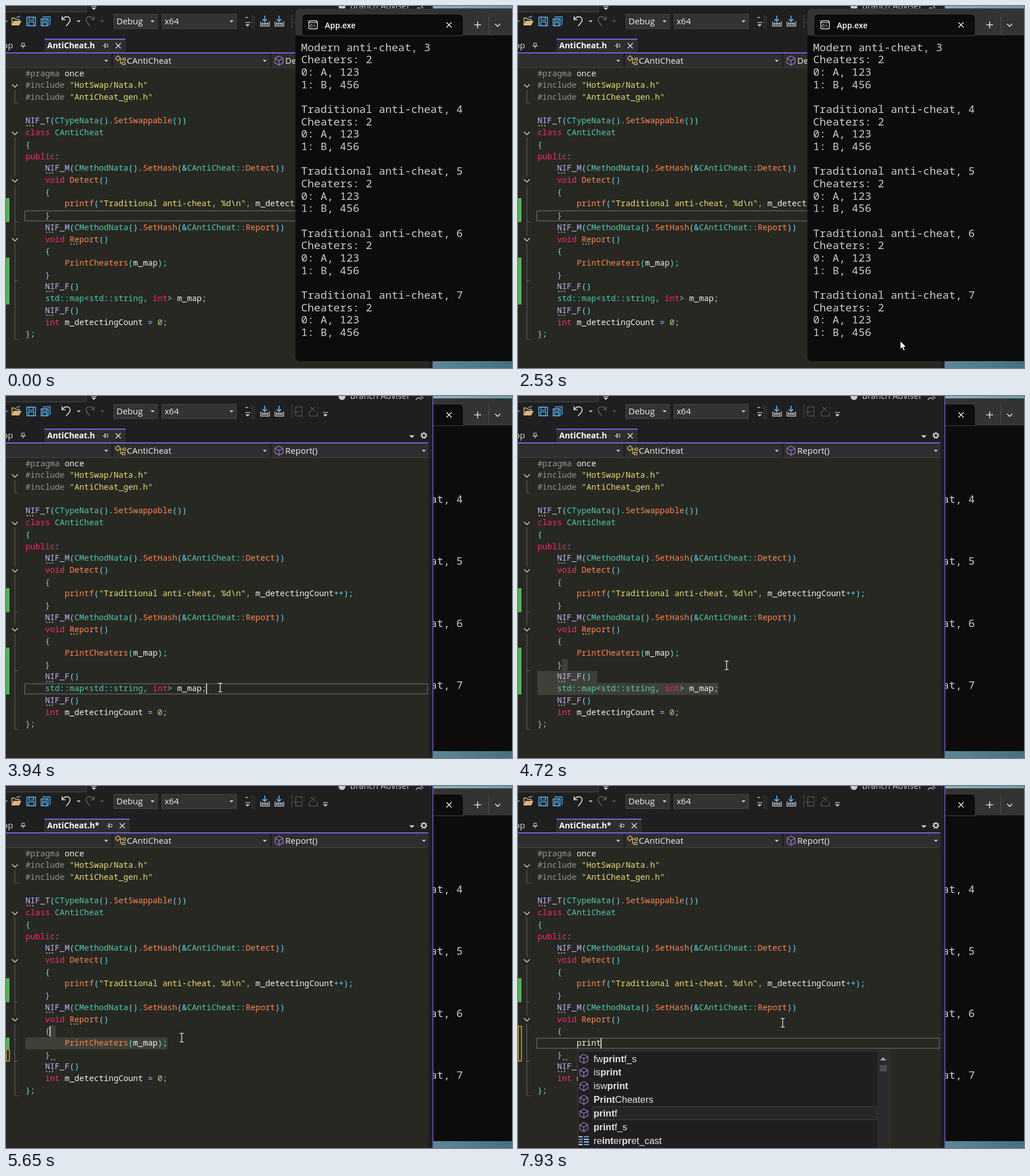
An HTML page with a canvas that plays this animation: 884x633 px, repeating every 8 s.

```html
<!DOCTYPE html>
<html lang="en">
<head>
<meta charset="utf-8">
<title>Hot swap demo</title>
<style>
html, body { margin: 0; width: 100%; height: 100%; overflow: hidden; background: #1f1f1f; }
canvas { display: block; }
</style>
</head>
<body>
<canvas id="stage" width="884" height="633"></canvas>
<script>
const ctx = document.getElementById('stage').getContext('2d');
const LOOP = 8000, ROW = 20.72, TOP = 108, LEFT = 34;
const MONO = '"Noto Sans Mono", "DejaVu Sans Mono", monospace';
const UI = '"Open Sans", "Noto Sans", sans-serif';
const LIST = '"Liberation Sans", sans-serif';
const CODE_FONT = '14.25px ' + MONO;

// Moments of the story, in ms
const RAISE = 3910, CUT = 4920, PRESS = 5400, RELEASE = 5920, ENTER = 6680, POPUP = 7620;
const KEYS = [7420, 7520, 7610, 7720, 7830];

const MOUSE = [
  [1160, 766, 645], [1170, 765, 629], [1400, 738, 605], [1630, 719, 589],
  [1770, 719, 589], [2040, 670, 586], [2520, 670, 586], [2530, 668, 586],
  [2750, 632, 592], [3050, 470, 553], [3320, 367, 520], [3340, 366, 519.5],
  [3590, 366, 519.5], [3790, 374.5, 511], [3930, 374.5, 511], [4120, 371, 488],
  [4320, 365, 472], [4430, 364.5, 471], [4920, 364.5, 471], [5350, 313, 452],
  [5480, 312, 452], [5650, 307, 440], [5720, 295, 435], [5750, 294, 433.5],
  [5920, 294, 433.5], [5990, 330, 452], [6170, 462.5, 414]
];

const SOURCE = `#pragma once
#include "HotSwap/Nata.h"
#include "AntiCheat_gen.h"

NIF_T(CTypeNata().SetSwappable())
class CAntiCheat
{
public:
    NIF_M(CMethodNata().SetHash(&CAntiCheat::Detect))
    void Detect()
    {
        printf("Traditional anti-cheat, %d\\n", m_detectingCount++);
    }
    NIF_M(CMethodNata().SetHash(&CAntiCheat::Report))
    void Report()
    {
        PrintCheaters(m_map);
    }
    NIF_F()
    std::map<std::string, int> m_map;
    NIF_F()
    int m_detectingCount = 0;
};`.split('\n');

const ITEMS = ['fw|print|f_s', 'is|print|', 'isw|print|', '|Print|Cheaters',
  '|print|f', '|print|f_s', 're|int|er|pr|et_cast'];

const OUTPUT = [3, 4, 5, 6, 7].flatMap(n => [
  (n === 3 ? 'Modern' : 'Traditional') + ' anti-cheat, ' + n,
  'Cheaters: 2', '0: A, 123', '1: B, 456', ''
]);

const RULES = [
  [/^"/, '#e6db74'], [/^#/, '#949494'], [/^NIF_/, '#bfb5ff'],
  [/^(class|public|void|int)$/, '#f92672'],
  [/^(CTypeNata|CMethodNata|CAntiCheat|std|map|string)$/, '#4ec9b0'],
  [/^(SetSwappable|SetHash|Detect|Report|printf|PrintCheaters)$/, '#ff8650'],
  [/^\d/, '#c5c874'], [/^\w/, '#f0f0ec'], [/./, '#66d9ef']
];

function box(color, x, y, w, h) {
  ctx.fillStyle = color;
  ctx.fillRect(x, y, w, h);
}

function frame(color, x, y, w, h, lw = 1) {
  ctx.strokeStyle = color;
  ctx.lineWidth = lw;
  ctx.strokeRect(x, y, w, h);
}

function round(color, x, y, w, h, r) {
  ctx.fillStyle = color;
  ctx.beginPath();
  ctx.roundRect(x, y, w, h, r);
  ctx.fill();
}

function line(color, lw, ...p) {
  ctx.strokeStyle = color;
  ctx.lineWidth = lw;
  ctx.beginPath();
  for (let i = 0; i < p.length; i += 2) ctx.lineTo(p[i], p[i + 1]);
  ctx.stroke();
}

function disc(color, x, y, r) {
  ctx.fillStyle = color;
  ctx.beginPath();
  ctx.arc(x, y, r, 0, 7);
  ctx.fill();
}

function text(s, x, y, font, color) {
  ctx.font = font;
  ctx.fillStyle = color;
  ctx.fillText(s, x, y);
  return ctx.measureText(s).width;
}

function triangle(color, x, y, r = 3.5, dir = 1) {
  ctx.fillStyle = color;
  ctx.beginPath();
  ctx.moveTo(x - r, y - dir * r / 2);
  ctx.lineTo(x + r, y - dir * r / 2);
  ctx.lineTo(x, y + dir * r / 2);
  ctx.fill();
}

const chevron = (x, y, r, color, lw = 1.5) =>
  line(color, lw, x - r, y - r / 2, x, y + r / 2, x + r, y - r / 2);

function cross(x, y, r, color) {
  line(color, 1.4, x - r, y - r, x + r, y + r);
  line(color, 1.4, x + r, y - r, x - r, y + r);
}

function cube(x, y) {
  const c = '#9b78c8';
  line(c, 1.3, x, y - 8, x + 7, y - 4, x + 7, y + 4, x, y + 8, x - 7, y + 4, x - 7, y - 4, x, y - 8);
  line(c, 1.3, x - 7, y - 4, x, y, x + 7, y - 4);
  line(c, 1.3, x, y, x, y + 8);
}

function pin(x, y, upright) {
  ctx.save();
  ctx.translate(x, y);
  if (upright) ctx.rotate(-Math.PI / 2);
  frame('#d0d0d0', -1, -2.5, 5, 4.5);
  line('#d0d0d0', 1.2, -1, -4.5, -1, 4.5);
  line('#d0d0d0', 1.2, -5, 0, -1, 0);
  ctx.restore();
}

function floppy(x, y, s) {
  const c = '#55aef0';
  frame(c, x - s, y - s, 2 * s, 2 * s, 1.6);
  frame(c, x - s * .5, y - s, s, s * .7, 1.4);
  frame(c, x - s * .6, y + s * .1, s * 1.2, s * .9, 1.4);
}

function swirl(x, y, dir, color) {
  line(color, 1.7, x - 7 * dir, y - 8, x - 7 * dir, y - 2, x - dir, y - 2);
  ctx.beginPath();
  ctx.moveTo(x - 7 * dir, y - 2);
  ctx.bezierCurveTo(x - 2 * dir, y - 10, x + 8 * dir, y - 8, x + 7 * dir, y - 1);
  ctx.quadraticCurveTo(x + 6 * dir, y + 3, x, y + 9);
  ctx.stroke();
}

function download(x) {
  line('#c8c8c8', 1.4, x - 7, 27, x - 7, 35, x + 8, 35, x + 8, 27);
  for (let i = -4; i <= 5; i += 3) box('#c8c8c8', x + i - 1, 29, 2, 4);
  line('#55aef0', 1.8, x, 17, x, 26);
  chevron(x, 25, 4, '#55aef0', 1.8);
}

function toolbar() {
  box('#2b2b2b', 0, 0, 140, 10);
  line('#464646', 1, 0, 10.5, 140.5, 10.5, 140.5, 0);
  line('#d0d0d0', 1.3, 149, 1, 158, 1);
  triangle('#d0d0d0', 153.5, 5, 4);

  triangle('#c8c8c8', 0, 27, 3);
  ctx.fillStyle = '#dcb67a';
  ctx.beginPath();
  for (const [x, y] of [[10, 34], [13, 26], [27, 26], [23, 34]]) ctx.lineTo(x, y);
  ctx.fill();
  line('#dcb67a', 1.5, 10.5, 34, 10.5, 21, 15, 21, 17, 23.5, 23, 23.5, 23, 26);
  line('#55aef0', 1.5, 18, 20, 25, 18);
  floppy(44, 27, 7.5);
  floppy(67.5, 28.5, 6);
  line('#55aef0', 1.4, 64, 19, 77, 19, 77, 33);
  swirl(105, 26, 1, '#d8d8d8');
  triangle('#c8c8c8', 127, 27);
  swirl(147, 26, -1, '#5c5c5c');
  triangle('#5c5c5c', 168, 27);

  for (const [x, w, label] of [[188, 77, 'Debug'], [272, 131, 'x64']]) {
    box('#333333', x, 14, w, 26);
    frame('#474747', x + .5, 14.5, w - 1, 25);
    text(label, x + 5, 32, '15px ' + UI, '#f0f0f0');
    triangle('#d8d8d8', x + w - 9, 27);
  }
  line('#c8c8c8', 1.3, 418, 20, 423, 20);
  line('#c8c8c8', 1.3, 418, 29, 427, 29);
  triangle('#c8c8c8', 422, 34, 4);
  for (let y = 17; y < 38; y += 4) {
    box('#686868', 429, y, 1.5, 1.5);
    box('#686868', 433, y + 2, 1.5, 1.5);
  }
  download(452);
  download(477);
  line('#505050', 1, 499.5, 15, 499.5, 39);
  frame('#505050', 506, 19, 11, 16, 1.4);
  line('#505050', 1.5, 502, 28, 513, 28);
  line('#505050', 1.4, 530, 27, 530, 35, 544, 35, 544, 27);
  cross(536, 23, 4, '#505050');
  line('#d0d0d0', 1.3, 554, 29, 562, 29);
  triangle('#d0d0d0', 558, 34, 4);

  disc('#c8c8c8', 587, 1, 6);
  text('Branch Adviser', 601, 5, '15px ' + UI, '#d0d0d0');
  line('#d0d0d0', 1.3, 716, 7, 718, 4, 722, 3, 726, 6);
  line('#d0d0d0', 1.3, 725, 0, 729, 4);
}

function tabs(raised, dirty) {
  const shift = dirty ? 7 : 0;
  text('pp', -6, 74, '15px ' + UI, '#d8d8d8');
  pin(30, 69, true);
  box('#2e2e2e', 67, 57, 142 + shift, 25);
  box('#7465df', 67, 57, 142 + shift, 2);
  text('AntiCheat.h' + (dirty ? '*' : ''), 72, 74, 'bold 14px ' + UI, '#ffffff');
  pin(174 + shift, 69.5, false);
  cross(196 + shift, 69.5, 4.5, '#e0e0e0');
  triangle('#d8d8d8', 709, 71, 4.5);
  ctx.setLineDash([2.4, 2]);
  ctx.beginPath();
  ctx.arc(730, 69, 5, 0, 7);
  ctx.strokeStyle = '#d0d0d0';
  ctx.lineWidth = 2;
  ctx.stroke();
  ctx.setLineDash([]);
  ctx.beginPath();
  ctx.arc(730, 69, 3.4, 0, 7);
  ctx.stroke();
  box('#7465df', 0, 81, 738, 2);

  box('#2e2e2e', 0, 83, 738, 25);
  box('#1f1f1f', 184, 83, 3, 25);
  box('#1f1f1f', 461, 83, 3, 25);
  box('#424242', 0, 107, 738, 1);
  text(':', -3, 101, '15px ' + UI, '#e0e0e0');
  for (const x of [175, 452, 730]) triangle('#d0d0d0', x, 96);
  const gold = '#d9b064';
  line(gold, 1.4, 191, 91, 196, 87, 200, 91, 195, 96, 191, 91);
  line(gold, 1.3, 198, 93, 205, 93);
  line(gold, 1.3, 200, 93, 200, 100, 203, 100);
  frame(gold, 205, 91, 4, 4, 1.3);
  frame(gold, 203, 98.5, 5, 4, 1.3);
  text('CAntiCheat', 211, 101, '15px ' + UI, '#f0f0f0');
  cube(477, 95.5);
  text(raised ? 'Report()' : 'Detect()', 488, 101, '15px ' + UI, '#f0f0f0');
}

function codeLine(s, row, charW) {
  const token = /"[^"]*"|#?\w+|[^\s\w]/g;
  let m;
  while ((m = token.exec(s))) {
    const color = RULES.find(r => r[0].test(m[0]))[1];
    text(m[0], LEFT + m.index * charW, TOP + row * ROW + 14.5, CODE_FONT, color);
  }
}

function dots(x, row, n = 3) {
  for (let i = 0; i < n; i++) box('#b4b4b0', x + 2 + i * 5, TOP + row * ROW + 17.3, 2, 2);
}

function margin(t, rows) {
  const green = '#55b155', gray = '#64645f';
  box(green, 0, 336, 6, 42);
  if (t < CUT) box(green, 0, 440, 6, 82);
  else {
    const top = t < ENTER ? 461 : 420;
    if (t < ENTER) box(green, 0, 440, 6, 20);
    frame('#d8b833', .5, top, 5.5, 481 - top, 1.4);
  }
  const end = TOP + rows * ROW - 1.5;
  line(gray, 1, 15.5, 146, 15.5, 169.5, 21, 169.5);
  line(gray, 1, 15.5, 229, 15.5, end, 21, end);
  for (const y of [377.5, 480.5]) line(gray, 1, 15.5, y, 21, y);
  for (const y of [139.5, 222.5, 305.5, 408.5]) {
    box('#272822', 8, y - 7, 15, 14);
    chevron(15.5, y, 5, '#d0d0cc');
  }
}

// Row of the caret while the mouse drags, else the row it rests on
function caretRow(t, mouse) {
  const under = Math.floor((mouse.y - 2 - TOP) / ROW);
  if (t < RAISE) return 12;
  if (t < CUT) return Math.max(17, Math.min(19, under));
  if (t < PRESS) return 17;
  if (t < RELEASE) return under < 16 ? 15 : 16;
  return t < ENTER ? 15 : 16;
}

function caretOn(t) {
  return t >= RAISE && !(t >= 4720 && t < CUT) && !(t >= 6170 && t < ENTER)
    && !(t >= 7310 && t < KEYS[0]);
}

function popup() {
  box('#1f1f20', 104, 463, 546, 170);
  frame('#3a3a3a', 104.5, 463.5, 545, 180);
  box('#2b2b2b', 628, 464, 21, 169);
  triangle('#999999', 638, 477, 6, -1);
  box('#4d4d4d', 632.5, 488, 12, 11);
  box('#262626', 131, 560, 496, 24);
  frame('#424242', 131.5, 560.5, 495, 23);
  ITEMS.forEach((item, i) => {
    const y = 477 + i * 23.9;
    let x = 132;
    item.split('|').forEach((part, k) => {
      x += text(part, x, y + 5.5, (k % 2 ? 'bold ' : '') + '16.5px ' + LIST, '#e4e4e4');
    });
    if (i < 6) cube(115, y);
    else for (let k = 0; k < 4; k++) {
      line(k % 3 ? '#55aef0' : '#d0d0d0', 2, 106, y - 7 + k * 4.5, 113, y - 7 + k * 4.5);
      line(k % 3 ? '#d0d0d0' : '#55aef0', 2, 115, y - 7 + k * 4.5, 124, y - 7 + k * 4.5);
    }
  });
}

function editor(t, mouse) {
  ctx.font = CODE_FONT;
  const charW = ctx.measureText('0').width;
  const lines = SOURCE.slice();
  if (t >= CUT) lines.splice(18, 2);
  const typed = KEYS.filter(k => t >= k).length;
  if (t >= ENTER) lines[16] = ' '.repeat(8) + 'print'.slice(0, typed);
  const endX = row => LEFT + lines[row].length * charW;

  box('#272822', 0, 108, 738, 525);
  const row = caretRow(t, mouse), y = TOP + row * ROW;
  let anchor = row;
  if (t >= RAISE && t < CUT) anchor = 19;
  if (t >= PRESS && t < ENTER) anchor = 16;
  for (let r = row; r <= anchor && anchor > row; r++) {
    const from = r === row ? endX(r) : LEFT;
    const to = endX(r) + (r < anchor ? 10 : 0);
    box('#3f4038', from, TOP + r * ROW, to - from, ROW + .3);
  }
  if (anchor === row) frame('#50514c', 33, y + 1.5, 703.5, 17.7, 2);
  margin(t, lines.length);

  lines.forEach((s, r) => {
    codeLine(s, r, charW);
    const at = s.indexOf('NIF_');
    if (at >= 0) dots(LEFT + at * charW, r);
  });
  if (t < RELEASE) dots(LEFT + 9 * charW, 14);
  if (t >= CUT) dots(LEFT + 5 * charW, 17, 2);
  if (caretOn(t)) box('#f4f4f0', endX(row) - .7, y + 1, 1.5, 18.5);
  if (t >= POPUP) popup();
}

function ide(t, mouse) {
  ctx.save();
  ctx.beginPath();
  ctx.rect(0, 0, 747, 633);
  ctx.clip();
  box('#1f1f1f', 0, 0, 746, 633);
  toolbar();
  tabs(t >= RAISE, t >= CUT);
  editor(t, mouse);
  box('#6a5bd0', 745, 0, 1.5, 633);
  ctx.restore();
}

function terminal() {
  ctx.save();
  ctx.beginPath();
  ctx.roundRect(505.5, 4.5, 420, 616.5, 8);
  ctx.fillStyle = '#0c0c0c';
  ctx.fill();
  ctx.save();
  ctx.clip();
  box('#333333', 505, 4, 400, 47.5);
  round('#0c0c0c', 517, 14, 282, 38, [8, 8, 0, 0]);
  ctx.restore();
  ctx.strokeStyle = '#444444';
  ctx.lineWidth = 1;
  ctx.stroke();

  ctx.beginPath();
  ctx.roundRect(529, 26, 15, 14, 2.5);
  ctx.strokeStyle = '#e0e0e0';
  ctx.lineWidth = 1.4;
  ctx.stroke();
  line('#e0e0e0', 1.2, 529, 29, 544, 29);
  text('C:\\', 531, 37, 'bold 7px ' + LIST, '#e0e0e0');
  text('App.exe', 557, 39, '600 14px ' + UI, '#ffffff');
  cross(774, 33, 4.5, '#f0f0f0');
  line('#f0f0f0', 1.4, 818, 33, 830, 33);
  line('#f0f0f0', 1.4, 824, 27, 824, 39);
  line('#505050', 1, 843.5, 16, 843.5, 50);
  chevron(859, 33.5, 4.5, '#f0f0f0');
  OUTPUT.forEach((s, i) => text(s, 515.5, 78.5 + i * 21.67, '18.85px ' + MONO, '#cccccc'));
  ctx.restore();
}

function wallpaper() {
  const g = ctx.createLinearGradient(746, 0, 884, 0);
  g.addColorStop(0, '#8fb3bb');
  g.addColorStop(1, '#6d9dab');
  box(g, 746, 0, 138, 20);
  const b = ctx.createLinearGradient(746, 0, 884, 0);
  b.addColorStop(0, '#5c8796');
  b.addColorStop(1, '#45707f');
  box(b, 746, 600, 138, 33);
}

function mouseAt(t) {
  const i = MOUSE.findIndex(k => k[0] > t);
  if (i === 0) return { x: 766, y: 660 };
  if (i < 0) return { x: 462.5, y: 414 };
  const [t0, x0, y0] = MOUSE[i - 1], [t1, x1, y1] = MOUSE[i];
  const f = (t - t0) / (t1 - t0);
  return { x: x0 + (x1 - x0) * f, y: y0 + (y1 - y0) * f };
}

function pointer({ x, y }) {
  if (x < 505) {
    line('#f0f0f0', 1.2, x, y - 7, x, y + 7);
    for (const dy of [-7.5, 7.5]) line('#f0f0f0', 1.2, x - 3.5, y + dy, x + 3.5, y + dy);
    return;
  }
  ctx.beginPath();
  for (const [dx, dy] of [[0, 0], [0, 14], [3.2, 11], [5.6, 16.5], [8, 15.5], [5.7, 10.2], [10, 10]]) {
    ctx.lineTo(x + dx, y + dy);
  }
  ctx.closePath();
  ctx.fillStyle = '#ffffff';
  ctx.fill();
  ctx.strokeStyle = '#000000';
  ctx.lineWidth = .7;
  ctx.stroke();
}

function draw(t) {
  const mouse = mouseAt(t);
  wallpaper();
  if (t < RAISE) {
    ide(t, mouse);
    terminal();
  } else {
    terminal();
    ide(t, mouse);
  }
  pointer(mouse);
}

let start;
function tick(now) {
  start ??= now;
  draw((now - start) % LOOP);
  requestAnimationFrame(tick);
}
draw(0);
requestAnimationFrame(tick);
</script>
</body>
</html>
```
